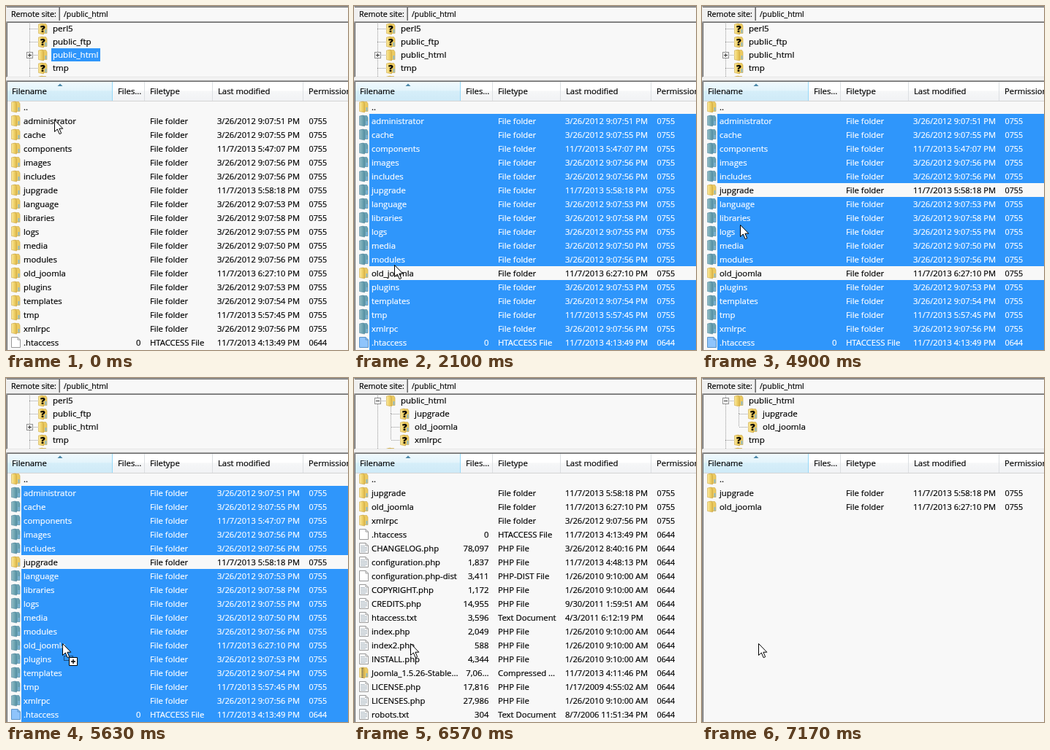
Write an HTML page that moves like this. It is 468 px wide and 472 px high and loops after 7.23 s.

```html
<!DOCTYPE html>
<html lang="en">
<head>
<meta charset="utf-8">
<style>
html, body { margin: 0; width: 100%; height: 100%; overflow: hidden; }
svg { display: block; }
text { font-family: "Open Sans", "Noto Sans", sans-serif; font-size: 11.3px; white-space: pre; stroke-width: .2px; }
.dots { stroke: #999; stroke-dasharray: 1 1; fill: none; }
.edge { fill: none; }
</style>
</head>
<body>
<svg width="468" height="472" viewBox="0 0 468 472">
  <defs>
    <linearGradient id="gold"><stop stop-color="#fbe9a0"/><stop offset=".5" stop-color="#f0d36c"/><stop offset="1" stop-color="#dcb64a"/></linearGradient>
    <linearGradient id="teal"><stop stop-color="#93bcc6"/><stop offset=".5" stop-color="#75a9b4"/><stop offset="1" stop-color="#538fa3"/></linearGradient>
    <linearGradient id="head" x2="0" y2="1"><stop offset=".45" stop-color="#fff"/><stop offset=".5" stop-color="#f6f7f8"/><stop offset="1" stop-color="#f1f2f4"/></linearGradient>
    <linearGradient id="sorted" x2="0" y2="1"><stop stop-color="#f0f9fd"/><stop offset=".45" stop-color="#e3f4fb"/><stop offset=".5" stop-color="#d5eef9"/><stop offset="1" stop-color="#cfeaf7"/></linearGradient>
    <clipPath id="treeClip"><path d="M2 23H468V97H2Z"/></clipPath>
  </defs>
  <path fill="#f0f0f0" d="M0 0H468V472H0Z"/>
  <path fill="#f8f8f8" d="M74 2H468V20H74ZM2 23H468V99H2ZM2 104H468V472H2Z"/>
  <!-- sunken panel edges: outer, inner, lower -->
  <path class="edge" stroke="#a0a0a0" d="M468 .5H0M72.5 1V20M468 21.5H.5V98M468 102.5H.5V472"/>
  <path class="edge" stroke="#696969" d="M468 1.5H1M73.5 2V20M468 22.5H1.5V97M468 103.5H1.5V472"/>
  <path class="edge" stroke="#e3e3e3" d="M2 97.5H468"/>
  <g id="tree" clip-path="url(#treeClip)"></g>
  <g id="header"></g>
  <g id="list"></g>
  <g id="pointer">
    <g id="drag">
      <path d="M2.5 17.5h12v6h-12z" fill="none" stroke="#000" stroke-dasharray="1 1"/>
      <path d="M9.5 19.5h11v11h-11z" fill="#fff" stroke="#000"/>
      <path d="M12 25h6M15 22v6" stroke="#000" stroke-width="1.4"/>
    </g>
    <path d="M.5 .5V16.5L4.3 13L7.2 19.7L9.7 18.6L6.9 12.2H11.8Z" fill="#fff" stroke="#000"/>
  </g>
</svg>
<script>
const LOOP = 7230, STEP = 200 / 3, DROP = 6160;
const $ = id => document.getElementById(id);

const folders = `administrator 51,cache 55,components *11/7/2013 5:47:07,images 56,includes 56,jupgrade *11/7/2013 5:58:18,language 53,libraries 58,logs 55,media 50,modules 56,old_joomla *11/7/2013 6:27:10,plugins 53,templates 54,tmp *11/7/2013 5:57:45,xmlrpc 56`
  .split(',').map(s => {
    const [name, ...rest] = s.split(' '), when = rest.join(' ');
    const date = when[0] === '*' ? when.slice(1) : '3/26/2012 9:07:' + when;
    return { name, size: '', type: 'File folder', date: date + ' PM', perm: '0755', icon: 'folder' };
  });

const files = `.htaccess|0|HTACCESS File|11/7/2013 4:13:49 PM
CHANGELOG.php|78,097|PHP File|3/26/2012 8:40:16 PM
configuration.php|1,837|PHP File|11/7/2013 4:48:13 PM
configuration.php-dist|3,411|PHP-DIST File|1/26/2010 9:10:00 AM
COPYRIGHT.php|1,172|PHP File|1/26/2010 9:10:00 AM
CREDITS.php|14,955|PHP File|9/30/2011 1:59:51 AM
htaccess.txt|3,596|Text Document|4/3/2011 6:12:19 PM
index.php|2,049|PHP File|1/26/2010 9:10:00 AM
index2.php|588|PHP File|1/26/2010 9:10:00 AM
INSTALL.php|4,344|PHP File|1/26/2010 9:10:00 AM
Joomla_1.5.26-Stable...|7,06...|Compressed ...|11/7/2013 4:11:46 PM
LICENSE.php|17,816|PHP File|1/17/2009 4:55:02 AM
LICENSES.php|27,986|PHP File|1/26/2010 9:10:00 AM
robots.txt|304|Text Document|8/7/2006 11:51:34 PM`
  .split('\n').map(s => {
    const [name, size, type, date] = s.split('|');
    const icon = type[0] === 'C' ? 'zip' : /^(PHP|Text) /.test(type) ? 'lines' : 'page';
    return { name, size, type, date, perm: '0644', icon };
  });

const items = [...folders, ...files];
const kept = ['jupgrade', 'old_joomla'];
const moving = items.filter(i => !kept.includes(i.name));

// time, x, y of the pointer tip
const path = [[433, 66, 156], [833, 60, 241], [1033, 54, 310], [1233, 57, 362], [1433, 57, 364],
  [2033, 57, 364], [2100, 55, 355], [2433, 50, 282], [2700, 49, 254], [3367, 50, 254], [3767, 50, 272],
  [4500, 50, 272], [4767, 45, 285], [5233, 71, 337], [5633, 77, 364]];
// time, number of items already moved away
const moved = [[6100, 0], [6567, 13], [6833, 18], [7167, 28]];

function at(keys, t, n) {
  const i = keys.findIndex(k => k[0] > t);
  if (i === 0) return keys[0][n];
  if (i < 0) return keys[keys.length - 1][n];
  const a = keys[i - 1], b = keys[i];
  return a[n] + (b[n] - a[n]) * (t - a[0]) / (b[0] - a[0]);
}

const text = (x, y, s, fill = '#000', more = '') => `<text x="${x}" y="${y}" fill="${fill}" stroke="${fill}" ${more}>${s}</text>`;
const rect = (x, y, w, h, fill) => `<rect x="${x}" y="${y}" width="${w}" height="${h}" fill="${fill}"/>`;

function icon(kind, x, y, on) {
  let s;
  if (kind === 'page' || kind === 'lines') {
    const edge = on ? '#5b93c8' : '#999';
    s = `<path d="M1.5 1.5H10L13.5 5V15.5H1.5Z" fill="${on ? '#8fc4fb' : '#fff'}" stroke="${edge}"/>
      <path d="M10 1.5V5H13.5" fill="none" stroke="${edge}"/>`;
    if (kind === 'lines') s += '<path d="M3 5.5H9M3 7.5H12M3 9.5H12M3 11.5H12M3 13.5H10" stroke="#a9b5be"/>';
  } else {
    const edge = on ? '#5489a0' : '#cba745';
    s = `<path d="M4 1.5H11.5L13 4V14.5H4Z" fill="${on ? '#6ba3b3' : '#eccb62'}" stroke="${edge}" stroke-width=".6"/>
      <path d="M1.5 2L7 1L8.5 4V16L1.5 14.5Z" fill="url(#${on ? 'teal' : 'gold'})" stroke="${edge}" stroke-width=".6"/>
      <path d="M11.5 9V14" stroke="${on ? '#7db4d8' : '#8fb9c9'}" stroke-width="2"/>`;
    if (kind === 'zip') s += '<path d="M5.5 2V15" stroke="#555" stroke-width="2.5" stroke-dasharray="1 1"/>';
    if (kind === 'unknown') s += text(4, 13, '?', '#000', 'style="font-weight:800;font-size:13px"');
  }
  return `<g transform="translate(${x} ${y})">${s}</g>`;
}

function drawHeader() {
  const cols = [['Filename', 8, 2], ['Files...', 153, 146], ['Filetype', 197, 190], ['Last modified', 290, 283], ['Permissions', 414, 407]];
  $('header').innerHTML = text(7, 15, 'Remote site:', '#000', 'style="font-size:10.7px"') +
    text(79, 15, '/public_html', '#000', 'style="font-size:10.5px"') +
    rect(2, 104, 466, 26, 'url(#head)') + rect(2, 104, 144, 26, 'url(#sorted)') +
    cols.map(([s, x, edge], i) => (i ? rect(edge - 1, 104, 1, 26, i > 1 ? '#dcdfe2' : '#96d9f9') : '') + text(x, 121, s)).join('') +
    rect(2, 130, 466, 1, '#d5d5d5') + '<path d="M70.5 110L74 106.5L77.5 110Z" fill="#4a87a8"/>';
}

function drawTree(rows, open, lit) {
  let s = '<path class="dots" d="M32.5 22V97"/>';
  rows.forEach(([name, depth], i) => {
    const y = 31 + 18 * i, x = depth ? 62 : 43, root = name === 'public_html';
    s += `<path class="dots" d="M${x - 11} ${y + .5}H${x}"/>`;
    if (depth) s += `<path class="dots" d="M50.5 ${y - (i === 1 ? 9 : 18)}V${y}"/>`;
    if (root) {
      s += `<rect x="28.5" y="${y - 3.5}" width="8" height="8" fill="#fff" stroke="#919191"/>
        <path d="M30 ${y + .5}H35${open ? '' : `M32.5 ${y - 2}V${y + 3}`}" stroke="#333"/>`;
      if (lit) s += rect(62, y - 9, 67, 18, '#2f96fb');
    }
    s += icon(root ? 'folder' : 'unknown', x, y - 8, false) +
      text(x + 21, y + 4, name, root && lit ? '#fff' : '#000', 'style="font-size:11.5px"');
  });
  $('tree').innerHTML = s;
}

function drawRow(item, top, on) {
  const c = on ? '#fff' : '#000', y = top + 14;
  return (on ? rect(21, top, 447, 19, '#2f96fb') : '') + icon(item.icon, 6, top + 1, on) +
    text(24, y, item.name, c) + text(184.5, y, item.size, c, 'text-anchor="end"') + text(197, y, item.type, c) +
    text(289, y, item.date, c, 'style="font-size:11.15px"') + text(414.5, y, item.perm, c, 'style="font-size:10.8px"');
}

function isSelected(name, t) {
  if (t < 165 || t > DROP) return false;
  if (t < 235) return name === 'administrator';
  if (name === 'jupgrade') return t < 3025;
  if (name === 'old_joomla') return t < 1695 || t > 5430;
  return true;
}

let shown;
function draw(t) {
  $('pointer').setAttribute('transform', `translate(${Math.round(at(path, t, 1))} ${Math.round(at(path, t, 2))})`);
  const dropped = t > DROP;
  $('drag').style.display = t > 5430 && !dropped ? '' : 'none';

  const gone = new Set(moving.slice(0, Math.round(at(moved, t, 1))));
  const rows = items.filter(i => !gone.has(i));
  const marks = rows.map(i => isSelected(i.name, t));
  const key = [gone.size, dropped, t < 165, marks].join();
  if (key === shown) return;
  shown = key;

  const kids = rows.filter(i => i.icon === 'folder').map(i => [i.name, 1]);
  const tree = dropped
    ? [['public_html', 0], ...kids, ['tmp', 0], ['', 0]].slice(0, 5)
    : [['perl5', 0], ['public_ftp', 0], ['public_html', 0], ['tmp', 0], ['', 0]];
  drawTree(tree, dropped, t < 165);
  const up = { name: '..', size: '', type: '', date: '', perm: '', icon: 'folder' };
  $('list').innerHTML = drawRow(up, 129, false) + rows.map((r, i) => drawRow(r, 148 + 19 * i, marks[i])).join('');
}

function tick() {
  const t = performance.now() % LOOP;
  draw(Math.max(0, Math.floor((t - 29) / STEP) * STEP + STEP / 2));
  requestAnimationFrame(tick);
}

drawHeader();
tick();
</script>
</body>
</html>
```
